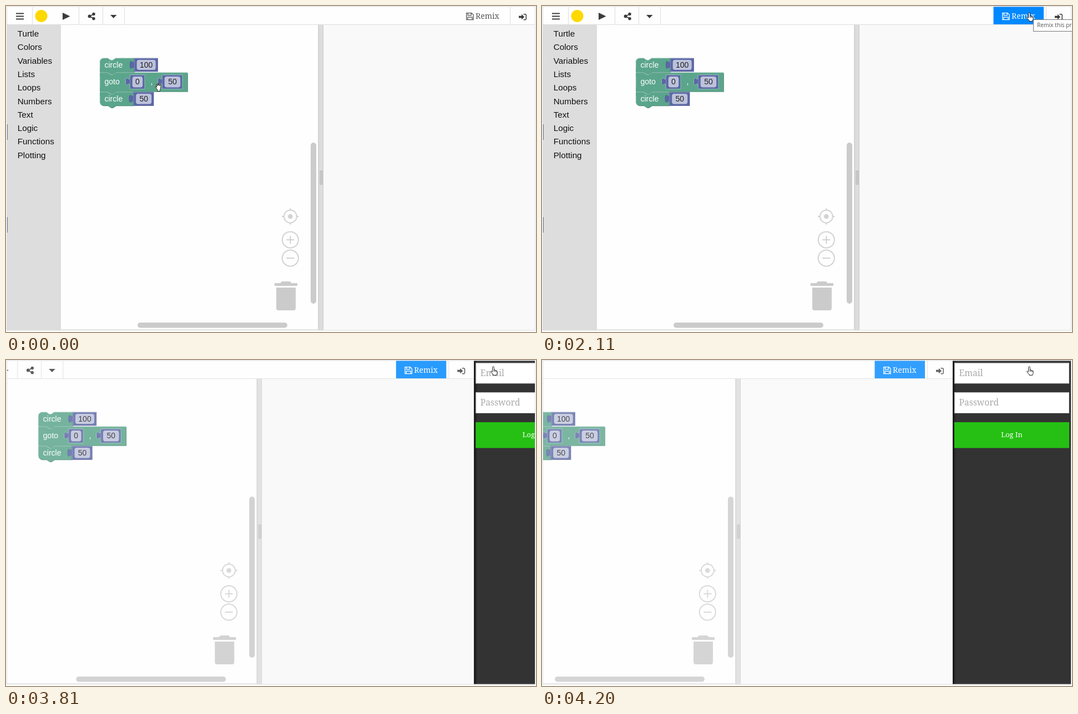
Write an HTML page that moves like this. It is 955x587 px and loops after 5.61 s.

```html
<!DOCTYPE html>
<html lang="en">
<head>
<meta charset="utf-8">
<title>Block editor</title>
<style>
html, body { margin: 0; width: 100%; height: 100%; overflow: hidden; background: #fff; }
svg { display: block; width: 955px; height: 587px; }
.sans { font-family: "Liberation Sans", Arial, sans-serif; }
.serif { font-family: "Noto Serif", serif; }
.tip { font-family: "Open Sans", sans-serif; }
</style>
</head>
<body>
<svg viewBox="0 0 955 587" xmlns="http://www.w3.org/2000/svg">
  <defs>
    <clipPath id="win"><rect x="2" y="1" width="952" height="583"/></clipPath>
    <linearGradient id="edge">
      <stop offset="0" stop-color="#111"/><stop offset="1" stop-color="#333"/>
    </linearGradient>
  </defs>
  <rect width="955" height="587" fill="#fff"/>

  <g clip-path="url(#win)">
    <g id="app">
      <rect x="2" y="1" width="952" height="583" fill="#fefefe"/>

      <!-- workspace, splitter, output -->
      <rect x="2" y="34" width="97" height="550" fill="#ddd"/>
      <path d="M2.5 213v28M2.5 380v28" stroke="#6b6f8c"/>
      <path d="M99 582.5H562.5V34" fill="none" stroke="#ddd"/>
      <rect x="563" y="34" width="9" height="550" fill="#ddd"/>
      <path d="M563.5 34V584M571.5 34V584" stroke="#cbcbcb"/>
      <rect x="565" y="296" width="6" height="26" fill="#c6c6c6"/>
      <rect x="572" y="34" width="382" height="550" fill="#f9f9f9"/>
      <g id="menu" class="sans" font-size="15.28" fill="#111"></g>
      <g id="blocks" class="sans" font-size="14"></g>

      <g fill="#cbcbcb">
        <rect x="549" y="246" width="10" height="290" rx="5"/>
        <rect x="237" y="570" width="270" height="9.5" rx="4.7"/>
        <path d="M484 504V499H494.5L497 496H512L514.5 499H525V504Z"/>
        <path d="M487 507H522V544Q522 548 518 548H491Q487 548 487 544Z"/>
      </g>
      <g fill="none" stroke="#d2d2d2" stroke-width="2">
        <circle cx="512.3" cy="379" r="11.5"/>
        <path d="M512.3 364v4M512.3 390v4M497 379h4M523.6 379h4"/>
        <circle cx="512.3" cy="379" r="4.3" fill="#d2d2d2" stroke="none"/>
        <circle cx="512.3" cy="421" r="14.6"/>
        <path d="M505.3 421h14M512.3 414v14"/>
        <circle cx="512.3" cy="454" r="14.6"/>
        <path d="M505.3 454h14"/>
      </g>

      <!-- toolbar -->
      <path d="M2 33.5H954M47.5 2V33M131.5 2V33M174.5 2V33M213.5 2V33M908.5 2V33" stroke="#ddd"/>
      <path d="M18 13.5H32M18 18.5H32M18 23.5H32" stroke="#3c3c3c" stroke-width="2.2"/>
      <circle cx="63.5" cy="18" r="11" fill="#ffd800"/>
      <g fill="#3c3c3c">
        <path d="M102 12L115.5 18.5L102 25Z"/>
        <path d="M188 16H199.5L193.7 22Z"/>
        <circle cx="150.5" cy="18.5" r="2.9"/>
        <circle cx="158" cy="14.5" r="2.7"/>
        <circle cx="158" cy="22.7" r="2.7"/>
        <path d="M158 14.5L150.5 18.5L158 22.7" fill="none" stroke="#3c3c3c" stroke-width="1.6"/>
        <path d="M924 17.8H929V14.8L934 19.7L929 24.6V21.6H924Z"/>
        <path d="M932.5 14.7H935.2Q937.2 14.7 937.2 16.7V22.7Q937.2 24.7 935.2 24.7H932.5" fill="none" stroke="#3c3c3c" stroke-width="1.5"/>
      </g>
      <rect id="hover" x="813.5" y="1" width="90.5" height="32" fill="#08f"/>
      <g id="remix">
        <path d="M829.7 12.7H839L842.2 15.9V24.7H829.7ZM832.3 12.7V16.8H838.2V12.7M832 24.7V20.2H840V24.7" fill="none" stroke="currentColor" stroke-width="1.3"/>
        <text class="serif" x="846" y="22.8" font-size="14" fill="currentColor">Remix</text>
      </g>
    </g>

    <g id="panel">
      <rect x="954" y="1" width="214" height="583" fill="#333"/>
      <rect x="954" y="1" width="6" height="583" fill="url(#edge)"/>
      <g fill="#fff" stroke="#ccc">
        <rect x="957.5" y="5.5" width="206" height="36.5"/>
        <rect x="957.5" y="58.5" width="206" height="37"/>
      </g>
      <path d="M958.5 42V6.5H1163M958.5 95V59.5H1163" fill="none" stroke="#e6e6e6"/>
      <rect x="957" y="112" width="207" height="46.5" fill="#25c013"/>
      <g class="serif" font-size="15.6" fill="#a9a9a9">
        <text x="965.5" y="29.3">Email</text>
        <text x="965.5" y="82.3">Password</text>
        <text x="1060.5" y="139.4" font-size="12.8" text-anchor="middle" fill="#fff">Log In</text>
      </g>
    </g>
  </g>
  <rect x="1.5" y="1" width="952" height="583" fill="none" stroke="#ddd"/>

  <g id="tip">
    <rect x="885.5" y="24.5" width="80" height="21" fill="#fff" stroke="#767676"/>
    <text class="tip" x="892" y="38.4" font-size="10.2" fill="#555">Remix this project</text>
  </g>
  <circle id="click" cx="877" cy="12" r="10.8" fill="#86c66c" opacity=".88"/>

  <g fill="#fff" stroke="#222" stroke-linejoin="round">
    <path id="grab" d="M4 11L1.2 8q-.6-1.3.8-1.5l1.8 1.5L2.7 3.2q.3-1.4 1.5-.6l.8 2.4V1.6q.8-1.2 1.7 0v3.2l.8-3q1-1 1.7.2L8.9 5.4l1.2-2.2q1.2-.6 1.4.7l-.9 5q0 2-1.2 4v2H5v-2z"/>
    <path id="arrow" d="M.5.5V11.5l2.6-2.4 2 4.6 2-.9-2-4.4h3.4z"/>
    <path id="point" d="M3.5 9V2q0-1.5 1.4-1.5T6.3 2v4.5q2-.8 2.2.6q1.7-.6 2 .7q1.6-.3 1.6 1.2v2.6q0 1.5-1.2 3v1.3H5v-1.2L1 10.3q-.8-1.2.2-1.6t2.3 1.4zM6.3 6.5v3M8.5 7.1v2.4M10.5 7.8v2"/>
  </g>
</svg>
<script>
const LOOP = 5610;
const $ = id => document.getElementById(id);
const show = (id, on) => $(id).setAttribute('visibility', on ? 'visible' : 'hidden');
const label = (x, y, s, attrs = '') => `<text x="${x}" y="${y}" ${attrs}>${s}</text>`;

$('menu').innerHTML = 'Turtle Colors Variables Lists Loops Numbers Text Logic Functions Plotting'
  .split(' ').map((s, i) => label(20.7, 55 + i * 24.3, s)).join('');

// Statement block with a notch above and a bump below
function statement(y, right, h, name, first, last) {
  const top = first ? `M169 ${y + 7}a7 7 0 0 1 7-7` : `M169 ${y}`;
  const notch = `${top}H183.3l5.7 3.8h2.9l5.7-3.8H${right}`;
  const foot = last ? 'H176a7 7 0 0 1-7-7' : 'H169';
  const body = `${notch}V${y + h}H197.6l-5.7 3.8h-2.9l-5.7-3.8${foot}Z`;
  return `<path d="${body}" fill="#49846f" transform="translate(.8 .8)"/>
    <path d="${body}" fill="#5ba58c"/>
    <path d="${notch}M169.4 ${y + 7}V${y + h - 7}" fill="none" stroke="#8cc0ae" stroke-width=".9"/>`
    + label(177.5, y + h / 2 + (h > 30 ? 4 : 4.3), name, 'fill="#fff"');
}

// Number block with a puzzle tab and an editable field
function number(x, y, w, h, value, inline) {
  const field = { x: x + 4.7, y: y + 3, w: w - 8.5, h: h - 6 };
  const d = `M${x} ${y}V${y + 4.8}c0 9.5-7.6-7.6-7.6 7.2s7.6-2.4 7.6 7.2V${y + h}h${w}V${y}Z`;
  const edge = inline ? 'stroke="#8cc0ae"' : 'stroke="#49528a" stroke-width=".6"';
  return `<path d="${d}" fill="#5b67a5" ${edge}/>
    <path d="M${x + .5} ${y + h}V${y + .5}h${w - 1}" fill="none" stroke="#8c95c0" stroke-width=".8"/>
    <rect x="${field.x}" y="${field.y}" width="${field.w}" height="${field.h}" rx="4" fill="#bdc2db"/>`
    + label(field.x + field.w / 2, y + h / 2 + 4.6, value, 'fill="#222" text-anchor="middle"');
}

$('blocks').innerHTML =
  statement(94, 231, 25, 'circle', true, false) +
  statement(120, 327, 34, 'goto', false, false) +
  statement(155, 229.5, 24.5, 'circle', false, true) +
  number(231, 94, 42.5, 24, '100') +
  number(223, 124, 27, 25.5, '0', true) +
  number(281, 124, 37, 25.5, '50', true) +
  number(229.5, 155, 36.5, 24.5, '50') +
  label(260.5, 140.5, ',', 'fill="#fff"');

function ease(u) {
  if (u <= 0) return 0;
  if (u >= 1) return 1;
  const bez = (s, a, b) => 3 * (1 - s) ** 2 * s * a + 3 * (1 - s) * s * s * b + s ** 3;
  let lo = 0, hi = 1;
  for (let i = 0; i < 24; i++) {
    const mid = (lo + hi) / 2;
    if (bez(mid, .25, .25) < u) lo = mid; else hi = mid;
  }
  return bez(lo, .1, 1);
}

const passed = (times, t) => times.filter(s => t >= s).length;
const moves = [
  { at: [230, 310, 400, 480], from: [270, 136], to: [522, 83] },
  { at: [710, 790, 860], from: [522, 83], to: [674, 101] },
  { at: [1090, 1170, 1240], from: [674, 101], to: [775, 51] },
  { at: [1470, 1560, 1640], from: [775, 51], to: [873, 11.5] }
];
const slideAt = [3660, 3740, 3810, 3900, 3970, 4050, 4120, 4200];

function cursor(t) {
  let pos = [268, 138.5];
  for (const m of moves) {
    const k = passed(m.at, t) / m.at.length;
    if (!k) break;
    const p = k * k * (3 - 2 * k);
    pos = m.from.map((v, i) => v + (m.to[i] - v) * p);
  }
  return pos;
}

function render(t) {
  const over = t >= 1560;
  const kind = t < 230 ? 'grab' : over ? 'point' : 'arrow';
  for (const id of ['grab', 'arrow', 'point']) show(id, id === kind);
  $(kind).setAttribute('transform', `translate(${cursor(t)})`);

  show('hover', over);
  $('remix').setAttribute('color', over ? '#fff' : '#555');
  show('tip', t >= 2110 && t < 3510);
  show('click', t >= 3510 && t < 3660);

  const ms = Math.max(0, passed(slideAt, t) - 1) * 75.5;
  const move = `translate(${-214 * ease(ms / 500)})`;
  $('app').setAttribute('transform', move);
  $('app').setAttribute('opacity', 1 - .2 * ease(ms / 300));
  $('panel').setAttribute('transform', move);
}

const start = performance.now();
function tick() {
  render((performance.now() - start) % LOOP);
  requestAnimationFrame(tick);
}
tick();
</script>
</body>
</html>
```
